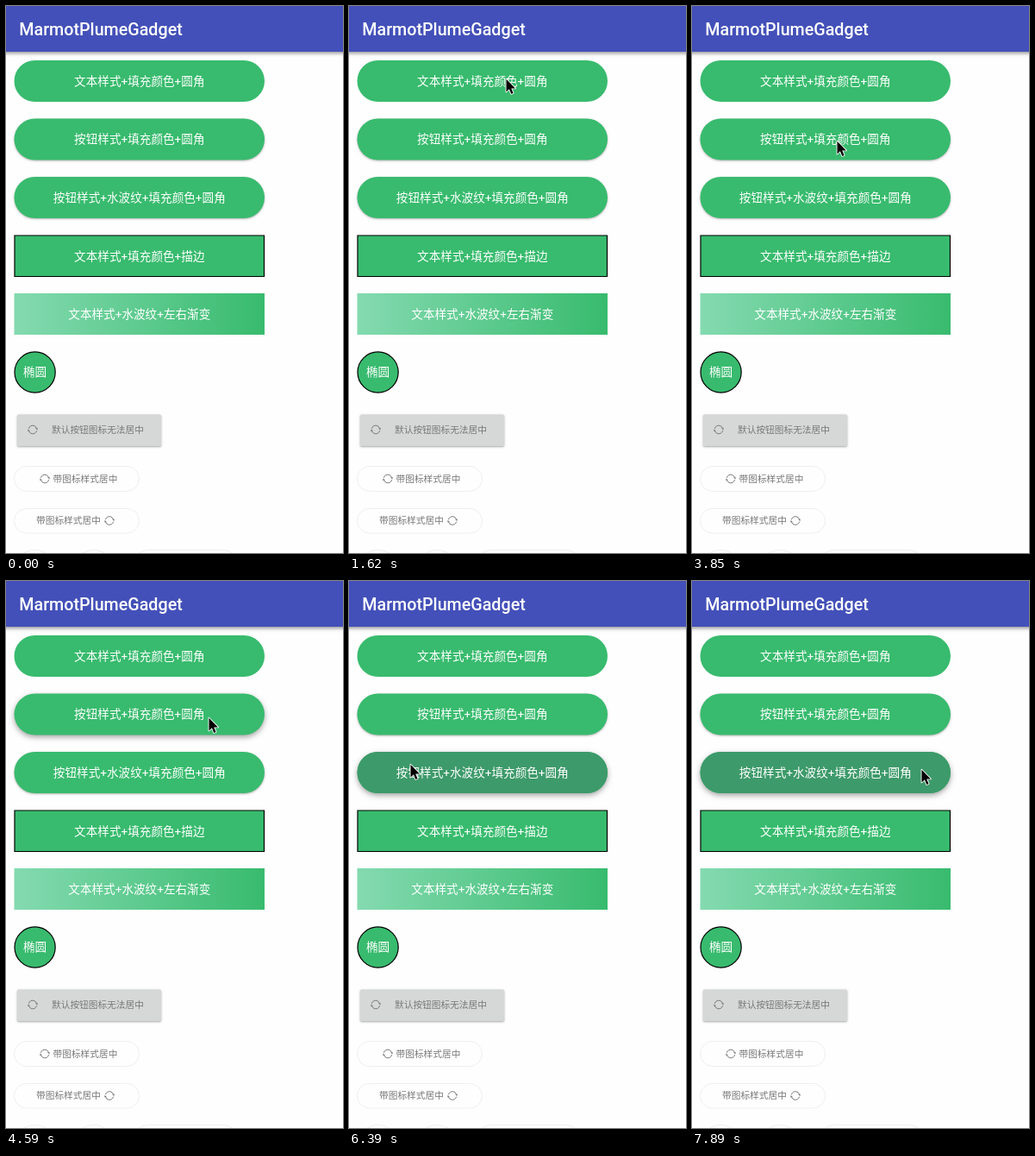
These frames come from a looping animation (391x634 px, 8 s). An HTML page with a canvas:

```html
<!DOCTYPE html>
<html lang="zh-CN">
<head>
<meta charset="utf-8">
<style>
  html, body { margin: 0; width: 100%; height: 100%; overflow: hidden; background: #fefefe; }
  canvas { display: block; width: 391px; height: 634px; }
</style>
</head>
<body>
<canvas id="stage"></canvas>
<script>
const W = 391, H = 634, LOOP = 8000;
const GREEN = '#38bb6e', PRESSED = '#3d9a6a', GREY = '#787878';
const FONT = 'Roboto, "Noto Sans CJK SC", "Noto Sans CJK", sans-serif';
const canvas = document.getElementById('stage');
const ctx = canvas.getContext('2d');
const dpr = window.devicePixelRatio || 1;
canvas.width = W * dpr;
canvas.height = H * dpr;

// Pointer moves: first step, last step, step count, destination, ease-out power
const START = { x: 248, y: 235, at: 150 };
const MOVES = [
  [300, 1030, 6, 95, 84, 1.5],
  [1620, 1920, 3, 223, 84, 2.8],
  [2370, 2950, 5, 81, 153, 1.5],
  [3700, 4150, 4, 235, 158, 1.2],
  [5040, 5490, 4, 71, 212, 1.5],
  [6540, 7140, 5, 266, 218, 1.5]
];

function pointerAt(t) {
  let { x, y } = START;
  for (const [from, to, steps, tx, ty, power] of MOVES) {
    if (t < from) break;
    const gap = (to - from) / (steps - 1);
    const step = Math.min(steps, Math.floor((t - from + 5) / gap) + 1);
    const p = 1 - Math.pow(1 - step / steps, power);
    x += (tx - x) * p;
    y += (ty - y) * p;
  }
  return { x: Math.round(x), y: Math.round(y) };
}

const between = (t, a, b) => t >= a && t < b;

function roundRect(x, y, w, h, r) {
  ctx.beginPath();
  ctx.roundRect(x, y, w, h, r);
}

function shadow(blur, dy, alpha) {
  ctx.shadowColor = `rgba(0,0,0,${alpha})`;
  ctx.shadowBlur = blur * dpr;
  ctx.shadowOffsetY = dy * dpr;
}

function raise(level) {
  shadow(2.5 + 4 * level, 1.1 + 1.5 * level, 0.3 + 0.06 * level);
}

function label(text, x, y, size, color, align = 'center') {
  ctx.font = `${size}px ${FONT}`;
  ctx.fillStyle = color;
  ctx.textAlign = align;
  ctx.textBaseline = 'alphabetic';
  ctx.fillText(text, x, y + size * 0.365);
}

function pill(y, text, level) {
  ctx.save();
  if (level !== undefined) raise(level);
  roundRect(9.5, y, 290.5, 48, 24);
  ctx.fillStyle = GREEN;
  ctx.fill();
  ctx.restore();
  if (text) label(text, 154.8, y + 24, 13.6, '#fff');
}

function refreshIcon(x, y) {
  ctx.save();
  ctx.translate(x, y);
  ctx.strokeStyle = ctx.fillStyle = GREY;
  ctx.lineWidth = 1;
  for (let i = 0; i < 2; i++) {
    ctx.beginPath();
    ctx.arc(0, 0, 4.8, Math.PI * 1.08, Math.PI * 1.88);
    ctx.stroke();
    ctx.beginPath();
    ctx.moveTo(2.9, -1.7);
    ctx.lineTo(5.9, -1.7);
    ctx.lineTo(5.3, 0.6);
    ctx.fill();
    ctx.rotate(Math.PI);
  }
  ctx.restore();
}

function outline(x, y, w, h, r) {
  roundRect(x, y, w, h, r);
  ctx.strokeStyle = '#efefef';
  ctx.lineWidth = 1;
  ctx.stroke();
}

function header() {
  ctx.save();
  shadow(4, 1.5, 0.4);
  ctx.fillStyle = '#4350b9';
  ctx.fillRect(-10, -10, W + 20, 63);
  ctx.restore();
  ctx.font = `500 19.7px ${FONT}`;
  ctx.fillStyle = '#fff';
  ctx.textAlign = 'left';
  ctx.fillText('MarmotPlumeGadget', 15.3, 34);
}

function rippleButton(t) {
  const level = t < 5940 ? 0 : t < 6090 ? 0.3 : t < 6390 ? 0.7 : 1;
  pill(198, '', level);
  if (t >= 5940) {
    const radius = t < 6090 ? 60 : t < 6390 ? 190 : 300;
    ctx.save();
    roundRect(9.5, 198, 290.5, 48, 24);
    ctx.clip();
    ctx.beginPath();
    ctx.arc(72, 213, radius, 0, Math.PI * 2);
    ctx.fillStyle = PRESSED;
    ctx.fill();
    ctx.restore();
  }
  label('按钮样式+水波纹+填充颜色+圆角', 154.8, 222, 13.6, '#fff');
}

function flatButtons() {
  ctx.fillStyle = GREEN;
  ctx.strokeStyle = '#000';
  ctx.lineWidth = 1.2;
  roundRect(10, 266, 289.5, 47.5, 0);
  ctx.fill();
  ctx.stroke();
  label('文本样式+填充颜色+描边', 154.8, 290, 13.6, '#fff');

  const fade = ctx.createLinearGradient(9.5, 0, 300, 0);
  fade.addColorStop(0, '#84dab0');
  fade.addColorStop(1, GREEN);
  ctx.fillStyle = fade;
  ctx.fillRect(9.5, 333, 290.5, 48);
  label('文本样式+水波纹+左右渐变', 154.8, 357, 13.6, '#fff');

  ctx.beginPath();
  ctx.arc(33.6, 424.5, 23.6, 0, Math.PI * 2);
  ctx.fillStyle = GREEN;
  ctx.fill();
  ctx.stroke();
  label('椭圆', 33.6, 424.5, 13.6, '#fff');
}

function iconButtons() {
  ctx.save();
  shadow(2.5, 1, 0.35);
  roundRect(13, 473.5, 167, 36.5, 1.5);
  ctx.fillStyle = '#d6d7d7';
  ctx.fill();
  ctx.restore();
  refreshIcon(31, 491);
  label('默认按钮图标无法居中', 53, 491, 10.7, GREY, 'left');

  outline(9.5, 533.5, 145, 29, 14.5);
  refreshIcon(45, 548);
  label('带图标样式居中', 54.5, 548, 10.7, GREY, 'left');

  outline(9.5, 582.5, 145, 28.5, 14.2);
  label('带图标样式居中', 35, 596.5, 10.7, GREY, 'left');
  refreshIcon(120, 596.5);

  outline(9.5, 630.5, 48, 48, 24);
  outline(78, 630.5, 48, 48, 24);
  outline(150, 630.5, 117, 29, 14.5);
}

function pointer(x, y) {
  const arrow = new Path2D('M0.5 0.8V15.4L3.9 12.2L6.3 17.9L8.6 16.9L6.2 11.4H10.9Z');
  ctx.save();
  ctx.translate(x, y);
  ctx.lineJoin = 'round';
  ctx.strokeStyle = '#fff';
  ctx.lineWidth = 1.8;
  ctx.stroke(arrow);
  ctx.fillStyle = '#000';
  ctx.fill(arrow);
  ctx.restore();
}

function draw(now) {
  const t = now % LOOP;
  const held = between(t, 3400, 3700) || between(t, 4150, 4890);
  ctx.setTransform(dpr, 0, 0, dpr, 0, 0);
  ctx.fillStyle = '#fefefe';
  ctx.fillRect(0, 0, W, H);
  header();
  pill(63, '文本样式+填充颜色+圆角');
  pill(130.5, '按钮样式+填充颜色+圆角', held ? 1 : 0);
  rippleButton(t);
  flatButtons();
  iconButtons();
  if (t >= START.at) {
    const p = pointerAt(t);
    pointer(p.x, p.y);
  }
  requestAnimationFrame(draw);
}
requestAnimationFrame(draw);
</script>
</body>
</html>
```
